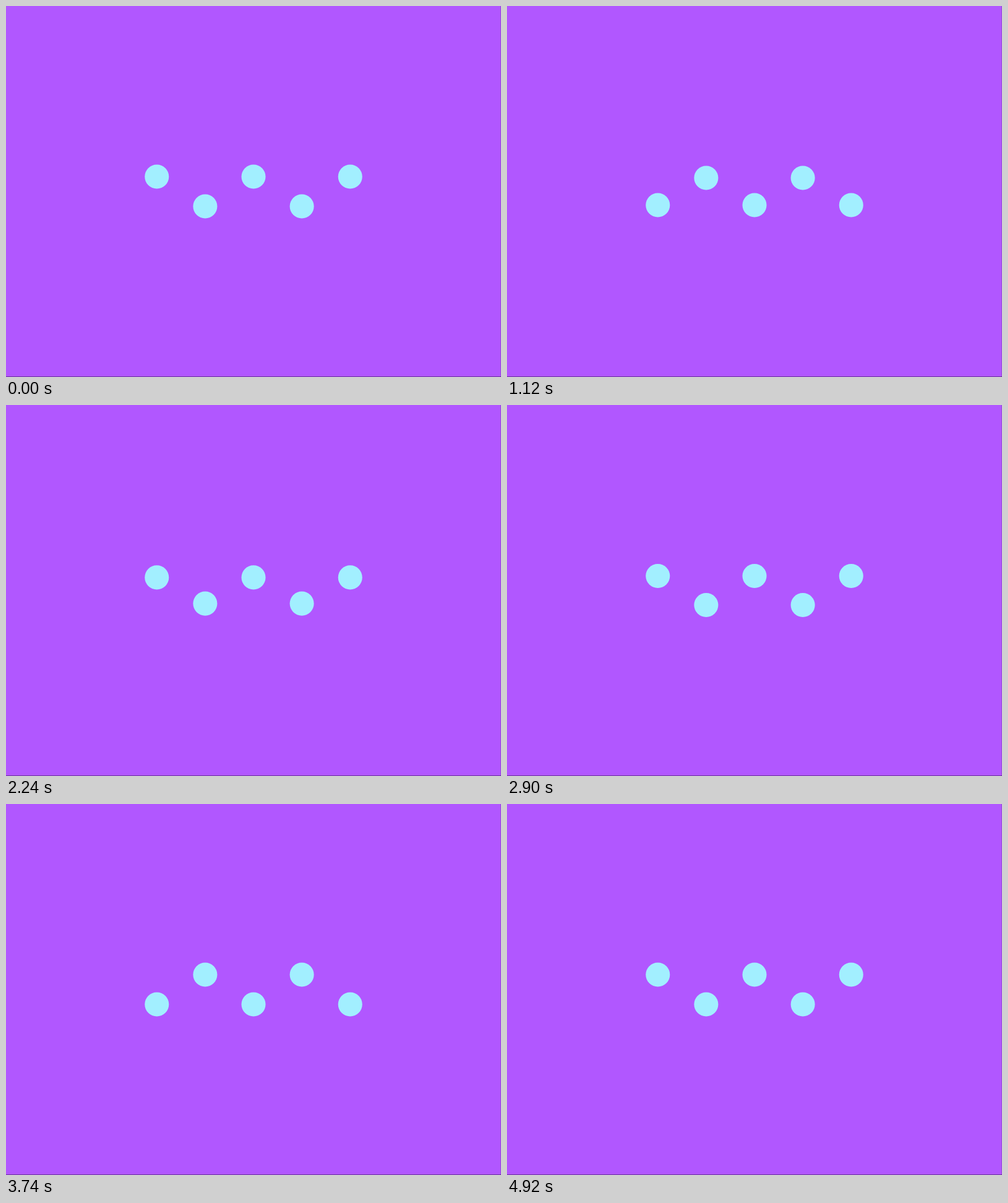
An HTML page with a canvas that plays this animation: 800x600 px, repeating every 4.94 s.

```html
<!DOCTYPE html>
<html lang="en">
<head>
<meta charset="utf-8">
<title>Bouncing dots</title>
<style>
  html, body { margin: 0; width: 100%; height: 100%; overflow: hidden; background: #b157ff; }
  canvas { display: block; }
</style>
</head>
<body>
<canvas id="stage" width="800" height="600"></canvas>
<script>
const ctx = document.getElementById('stage').getContext('2d');
const LOOP = 4940;
const GAP = 78.125;
const RADIUS = GAP / 4;
const REST = GAP * 0.3;
const FLIPS = [565, 1785, 3003, 4222];

// Underdamped spring from 0 to 1, t in ms
const HALF_SWING = 240;
const OVERSHOOT = 0.23;
const FREQ = Math.PI / HALF_SWING;
const DECAY = -Math.log(OVERSHOOT) / HALF_SWING;

function spring(t) {
  const phase = FREQ * t;
  return 1 - Math.exp(-DECAY * t) * (Math.cos(phase) + DECAY / FREQ * Math.sin(phase));
}

// Vertical offset of the outer and middle dots; the other two mirror it
function offset(time) {
  let i = FLIPS.length - 1;
  while (i >= 0 && FLIPS[i] > time) i--;
  const start = i < 0 ? FLIPS[FLIPS.length - 1] - LOOP : FLIPS[i];
  const side = i === 0 || i === 2 ? 1 : -1;
  return side * REST * (2 * spring(time - start) - 1);
}

function draw(time) {
  ctx.fillStyle = '#b157ff';
  ctx.fillRect(0, 0, 800, 600);

  // Thin darker edge at the right and bottom
  ctx.fillStyle = 'rgba(0, 0, 0, 0.15)';
  ctx.fillRect(799, 0, 1, 600);
  ctx.fillStyle = 'rgba(0, 0, 0, 0.4)';
  ctx.fillRect(0, 599, 800, 1);

  const d = offset(time);
  ctx.fillStyle = '#a2efff';
  for (let i = -2; i <= 2; i++) {
    ctx.beginPath();
    ctx.arc(400 + i * GAP, 300 + (i % 2 ? -d : d), RADIUS, 0, Math.PI * 2);
    ctx.fill();
  }
}

const begin = performance.now();
function tick() {
  draw((performance.now() - begin) % LOOP);
  requestAnimationFrame(tick);
}
tick();
</script>
</body>
</html>
```
